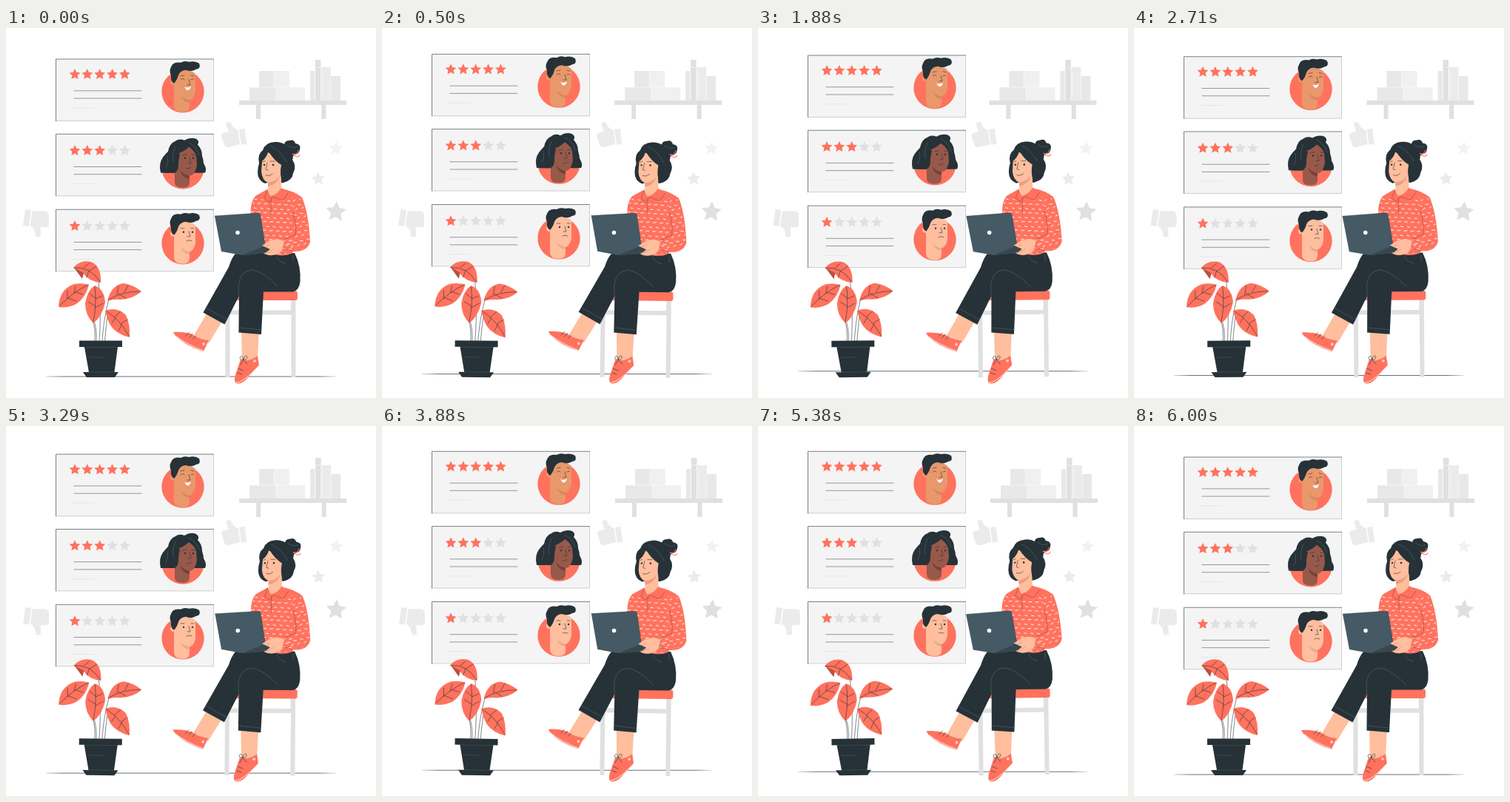
Animation, 500 px wide and 500 px high, one loop 6.04 s. Source, as an HTML page:

```html
<!DOCTYPE html>
<html lang="en">
<head>
<meta charset="utf-8">
<title>Customer reviews</title>
<style>
html, body { margin: 0; width: 100%; height: 100%; overflow: hidden; background: #fff; }
svg { display: block; width: 100vw; height: 100vh; }
.coral { fill: #ff725e; }
.dark { fill: #263238; }
.skin { fill: #ffbe9d; }
.ink { fill: none; stroke: #263238; stroke-width: .6; stroke-linecap: round; stroke-linejoin: round; }
.seam { fill: none; stroke: #55666f; stroke-width: .6; stroke-linecap: round; }
.shade { fill: none; stroke: #b84f42; stroke-width: .8; stroke-linecap: round; }
</style>
</head>
<body>
<svg viewBox="0 0 500 500">
<defs>
  <pattern id="dash" width="9" height="12" patternUnits="userSpaceOnUse" patternTransform="rotate(3)">
    <path d="M1,3l4,-.5M5.500,9l3,.6" stroke="#fff" stroke-linecap="round"/>
  </pattern>
  <pattern id="dash2" width="9" height="12" patternUnits="userSpaceOnUse" patternTransform="rotate(-14)">
    <path d="M1,3l3.600,1M5,9l3,-1.200" stroke="#fff" stroke-linecap="round"/>
  </pattern>
  <linearGradient id="fade"><stop offset="0" stop-color="#263238" stop-opacity=".3"/><stop offset=".06" stop-color="#263238"/><stop offset=".94" stop-color="#263238"/><stop offset="1" stop-color="#263238" stop-opacity=".2"/></linearGradient>
  <clipPath id="bust"><path d="M-40,-50H40V7H27.800A28.700,28.700 0 0 1 -27.800,7H-40Z"/></clipPath>
  <g id="thumb" fill="#ebebeb">
    <path d="M7,-6Q0,-9 -1,-17Q-4,-21 -8,-17L-6,-6L-13,-5Q-17,-4 -16,0L-14,12Q-13,15 -8,15L7,13Z"/>
    <path d="M8.500,-7H16V14H8.500Z"/>
  </g>
  <g id="man">
    <path d="M-12,-20V18Q-12,28 0,28Q9,28 9,20V12Q15,10 17,0V-24Q5,-34 -8,-27Z"/>
    <circle cx="-13" cy="-13" r="4"/>
    <path d="M9,12Q0,10 -3,4Q0,15 9,15Z" fill="#000" opacity=".1"/>
    <path class="dark" d="M-12,-11Q-17,-14 -16,-22Q-19,-28 -16,-33Q-13,-41 -3,-39Q2,-42 8,-40Q17,-42 22,-38Q25,-31 18,-30Q12,-26 4,-29Q-4,-28 -6,-22Q-8,-15 -12,-11Z"/>
    <path class="ink" d="M8,-16L10,-9H6"/>
  </g>
</defs>

<g id="back">
  <path fill="#e0e0e0" d="M315,98H460V104H432.500V123H426.500V104H344V123H338V104H315Z"/>
  <path fill="#e8e8e8" d="M329,80H365V98H329ZM342,58H362V80H342ZM411,58H417.500V98H411ZM439,65H452V98H439Z"/>
  <path fill="#f0f0f0" d="M365,80H404V98H365ZM362,58H383V80H362Z"/>
  <path fill="#e0e0e0" d="M418,43H425.500V98H418Z"/>
  <path fill="#ebebeb" d="M426,53H439V98H426Z"/>
  <path fill="none" stroke="#fff" stroke-width=".5" d="M329,80H404M362,58V80M365,80V98M417.700,58V98M425.700,53V98M439,65V98M419,53H425M428,58V92"/>
  <use href="#thumb" transform="translate(307.500 145) rotate(-8)"/>
  <use href="#thumb" transform="translate(41 262) rotate(188) scale(1.07)"/>
</g>

<rect id="floor" x="54" y="470.800" width="392" height=".7" fill="url(#fade)"/>

<g id="cards"></g>

<g id="plant">
  <path class="ink" stroke-dasharray="3 .8" d="M122,424Q123,408 119,396M120,424Q121,408 118,398M126,424Q129,380 125,343M130,424Q132,392 139,367M133.500,424Q135,405 137,390"/>
  <path class="coral" d="M91,324Q100,313 115,316Q129,322 128,344Q112,343 104,331ZM71,377Q72,353 92,346Q103,344 112,347Q108,364 95,373Q83,379 71,377ZM137,369Q142,347 159,345Q172,347 183,356Q172,366 155,367Q145,366 137,369ZM120,348Q133,353 134,371Q130,390 118,399Q107,388 107,372Q110,354 120,348ZM134,382Q150,376 162,388Q168,400 167,418Q150,414 142,403Q137,395 134,382Z"/>
  <path fill="#b84f42" d="M92,324L103,339L105,331Z"/>
  <path class="ink" stroke-width=".5" d="M92,324Q114,322 127,343M105,324L112,318M113,328L122,322M112,328L109,337M73,375Q90,357 111,347M83,366V355M92,358L94,349M84,365L95,369M94,357L104,360M139,367Q156,356 181,356M150,360L152,349M160,357L165,348M152,359L162,365M120,350Q123,372 118,397M121,365L113,359M121,376L111,370M121,366L130,362M121,378L131,372M136,383Q155,395 166,416M147,390L155,383M156,399L164,394M148,391L143,399M157,400L152,409"/>
  <path class="dark" d="M99,422.500H157V431H151L146.500,465H152L147,472H109L104,465H112L106,431H99Z"/>
  <path class="seam" d="M106,431.400H151M112,465H146M112,445H132" opacity=".7"/>
</g>

<g id="woman">
  <path fill="#e0e0e0" d="M296.500,362H302.500V381.500H385V366H391.500V472H385.500V387.500H302.500V472H296.500Z"/>
  <rect class="coral" x="308" y="355.500" width="86" height="12.500" rx="3"/>
  <path class="skin" d="M276,378L296,390L274,426L254,415ZM318,408L342,408L340,448L319,450Z"/>
  <path class="coral" d="M226,411Q240,410 252,414Q262,421 274,422L267,437Q242,429 229,416ZM317,448Q328,452 340,443L342,456L329,470Q319,483 311,480Q307,477 311,466Z"/>
  <path fill="none" stroke="#fff" stroke-width=".8" d="M229,416Q245,428 267,436M311,479Q320,480 342,456"/>
  <circle cx="267" cy="427" r="2" fill="#ffc7bf"/><circle cx="336" cy="450" r="2" fill="#ffc7bf"/>
  <path class="ink" d="M243,416L248,411M248,418L252,413M253,420L257,416M314,460L321,463M313,466L319,468M321,448Q314,449 317,444Q320,442 321,448Q323,441 326,444Q326,449 321,448L317,455M321,448L326,454"/>
  <path class="dark" d="M352,305L390,304Q399,322 397.500,343Q396,355 388,356.500H348L345,414L314.500,411.500L315,362L295.500,400.500L266.500,384.500L301,323Q308,300 321,299.500Q340,301 352,305Z"/>
  <path class="seam" d="M315,362Q310,329 333,327Q348,329 368,350M270,378L299,394M315,405L345,408M366,309Q369,317 378,318M388,307V315"/>

  <path class="dark" d="M381,172Q373,168 376,160Q375,152 383,152Q389,150 391,156Q399,157 397,164Q396,171 390,171Q387,176 381,172ZM342,183Q339,171 347,165Q350,155 363,154Q378,153 386,168Q389,173 387,178Q393,187 388,196Q387,206 375,209Q369,210 364,206L350,210Q340,206 340,195Q340,188 342,183Z"/>
  <path class="skin" d="M346,180Q352,175 354,168Q364,172 372,183V196L372,217Q366,231 354,228V209Q346,206 345,194Z"/>
  <path fill="#eb9c80" d="M354,209Q364,208 370,200Q366,212 354,214Z"/>
  <path class="dark" d="M355,167Q362,179 372,185Q369,198 374,209Q383,206 386,198L380,171Z"/>
  <path class="ink" d="M353,182L351,191L354,192M347,181L350,180M357,180L363,180M351,199Q356,201 360,197" stroke-width=".9"/>
  <circle class="dark" cx="349" cy="185" r="1.200"/><circle class="dark" cx="361" cy="185" r="1.300"/>
  <path d="M387,170Q394,172 395,165M387,170Q395,177 397,171" fill="none" stroke="#ff725e"/>
  <path class="seam" d="M358,160Q371,165 379,181M380,158Q388,164 394,160"/>

  <path class="coral" d="M353,218L337,227Q329,236 331,256L349,302Q371,311 386,305L388,302Q407,303 411,289Q409,250 400,229Q389,220 372,217Q366,229 354,229Z"/>
  <path fill="url(#dash)" d="M349,232L337,229Q330,238 331,258L349,302Q371,309 386,304L387,288L386,228L376,231L358,236Z"/>
  <path fill="url(#dash2)" d="M386,226L398,230Q408,254 410,286Q408,301 388,301L374,292L390,281Z"/>
  <path class="coral" d="M353,218L349,230L355,236L361,229L374,234L382,223L372,216Q366,226 357,227Z"/>
  <path class="shade" d="M353,219L349,230L355,235L361,228L374,233L381,223M358,230V252M388,249Q393,270 391,279L374,287M375,288L371,299M387,302Q385,299 372,299"/>
  <path class="skin" d="M376,288Q365,283 357,288L346,293L348,300L357,299L349,305Q361,311 373,301Z"/>
  <path fill="#455a64" d="M282,254L341,250Q343,250 343.500,252L350,292L357,294L356,304L319,307L291,302Z"/>
  <path fill="#37474f" d="M319,307L348,295L357,294L356,304Z"/>
  <path class="ink" d="M282,254L341,250Q343,250 343.500,252L350,292" opacity=".6"/>
  <circle cx="313" cy="276.500" r="2.800" fill="#fff"/>
  <path class="skin" d="M346,294L357,287L369,288L372,299Q362,309 349,305L357,299Z"/>
  <path d="M348,304Q357,304 362,298M357,293L351,295" fill="none" stroke="#e58e72" stroke-width=".7"/>
</g>
</svg>

<script>
const $ = id => document.getElementById(id);

function star(x, y, r, fill, tilt = 0) {
  const pts = Array.from({ length: 10 }, (_, i) => {
    const a = (i * 36 - 90 + tilt) * Math.PI / 180, d = i % 2 ? r * .48 : r;
    return (x + d * Math.cos(a)).toFixed(1) + ',' + (y + d * Math.sin(a)).toFixed(1);
  });
  return `<polygon points="${pts.join(' ')}" fill="${fill}"/>`;
}

const smiling = `<use href="#man" fill="#e8986b"/>
  <path class="ink" d="M-3,-16Q0,-19 2,-16M11,-16Q14,-18 15,-16M-3,-21L2,-22M11,-22L15,-21"/>
  <path d="M2,-6Q7,-4 11,-7Q9,0 5,-2Z" fill="#fff"/>`;
const curly = `<path class="dark" d="M-30,7Q-33,-6 -27,-14Q-24,-18 -20,-22Q-18,-33 -10,-36Q-5,-40 2,-37Q10,-42 18,-39Q23,-36 20,-31Q26,-25 26,-16Q28,-10 28,-6Q33,2 30,7Z"/>
  <path fill="#97594a" d="M-7,-19Q2,-22 8,-28Q16,-23 18,-16L19,-4Q17,10 9,11V20Q9,27 0,27Q-11,27 -11,20V4Z"/>
  <path fill="#74433a" d="M9,11Q1,9 -4,3Q-1,14 9,15Z"/>
  <path class="dark" d="M-11,7Q-5,4 -6,-8L-4,-19L-15,-20L-24,7Z"/>
  <path class="ink" d="M9,-14L11,-6H7M0,-17L5,-18M12,-18L16,-17M5,1Q8,2 11,-1"/>
  <circle class="dark" cx="3" cy="-13" r="1.200"/><circle class="dark" cx="14" cy="-13" r="1.200"/>
  <path class="seam" d="M-21,-16Q-19,-8 -23,0M-10,-29Q-15,-18 -13,-8M8,-34Q18,-30 22,-17"/>`;
const frowning = `<use href="#man" fill="#ffbe9d"/>
  <path class="ink" d="M-3,-20L2,-20M11,-20L15,-20M5,-3Q8,-5 12,-3"/>
  <circle class="dark" cx="1" cy="-15" r="1.200"/><circle class="dark" cx="13" cy="-15" r="1.200"/>`;

// top edge, rating, y of the stars, y of the first line, portrait
const reviews = [
  [42.3, 5, 20.800, 42.800, smiling],
  [143.600, 3, 22.500, 44.200, curly],
  [245.500, 1, 22.500, 44.200, frowning]
];

$('cards').innerHTML = reviews.map(([top, rating, starY, lineY, face]) => {
  const stars = [0, 1, 2, 3, 4].map(i =>
    star(93 + i * 16.850, starY, 7.800, i < rating ? '#ff725e' : '#e0e0e0')).join('');
  return `<g transform="translate(0 ${top})">
    <rect x="67.500" width="213" height="83.500" fill="#f4f4f4"/>
    <path class="ink" d="M67.500,83.500V0H280.500"/>
    <path class="ink" d="M67.500,83.500H280.500V0" opacity=".35"/>
    ${stars}
    <path class="ink" d="M92,${lineY}H183M92,${lineY + 10.200}H183" opacity=".8"/>
    <path class="ink" d="M90,${lineY + 23}H119" opacity=".12"/>
    <g transform="translate(239 ${starY + 23})">
      <circle class="coral" r="28.700"/>
      <g clip-path="url(#bust)">${face}</g>
    </g></g>`;
}).join('');

$('back').innerHTML += star(446, 163, 9.500, '#f2f2f2', 4) + star(422, 204, 9.500, '#ebebeb', -4) + star(446, 248.500, 14.500, '#e0e0e0', 4);

// linear interpolation through [position, value] stops
function follow(stops, p) {
  const i = stops.findIndex(s => s[0] > p);
  const [a, u] = stops[i - 1], [b, v] = stops[i];
  return u + (v - u) * (p - a) / (b - a);
}
const rise = [[0, 0], [.5, -10], [1, 0]];
const sway = [[0, 0], [.25, 1], [.75, -1], [1, 0]];
const shake = [0, -1, 2, -4, 4, -4, 4, -4, 2, -1, 0].map((x, i) => [i / 10, x]);

const LOOP = 6040, LEAD = 20;
const start = performance.now();

function draw() {
  const t = (performance.now() - start) % LOOP + LEAD;
  const at = (stops, period) => follow(stops, t % period / period);
  const move = (id, value) => $(id).setAttribute('transform', value);
  const angle = at(sway, 3000);
  move('cards', `translate(0 ${at(rise, 1500)})`);
  move('floor', `translate(0 ${at(rise, 3000)})`);
  move('back', `translate(${at(shake, 6000)} 0)`);
  move('plant', `rotate(${angle} 127 393)`);
  move('woman', `rotate(${angle} 318 316)`);
  requestAnimationFrame(draw);
}
draw();
</script>
</body>
</html>
```
